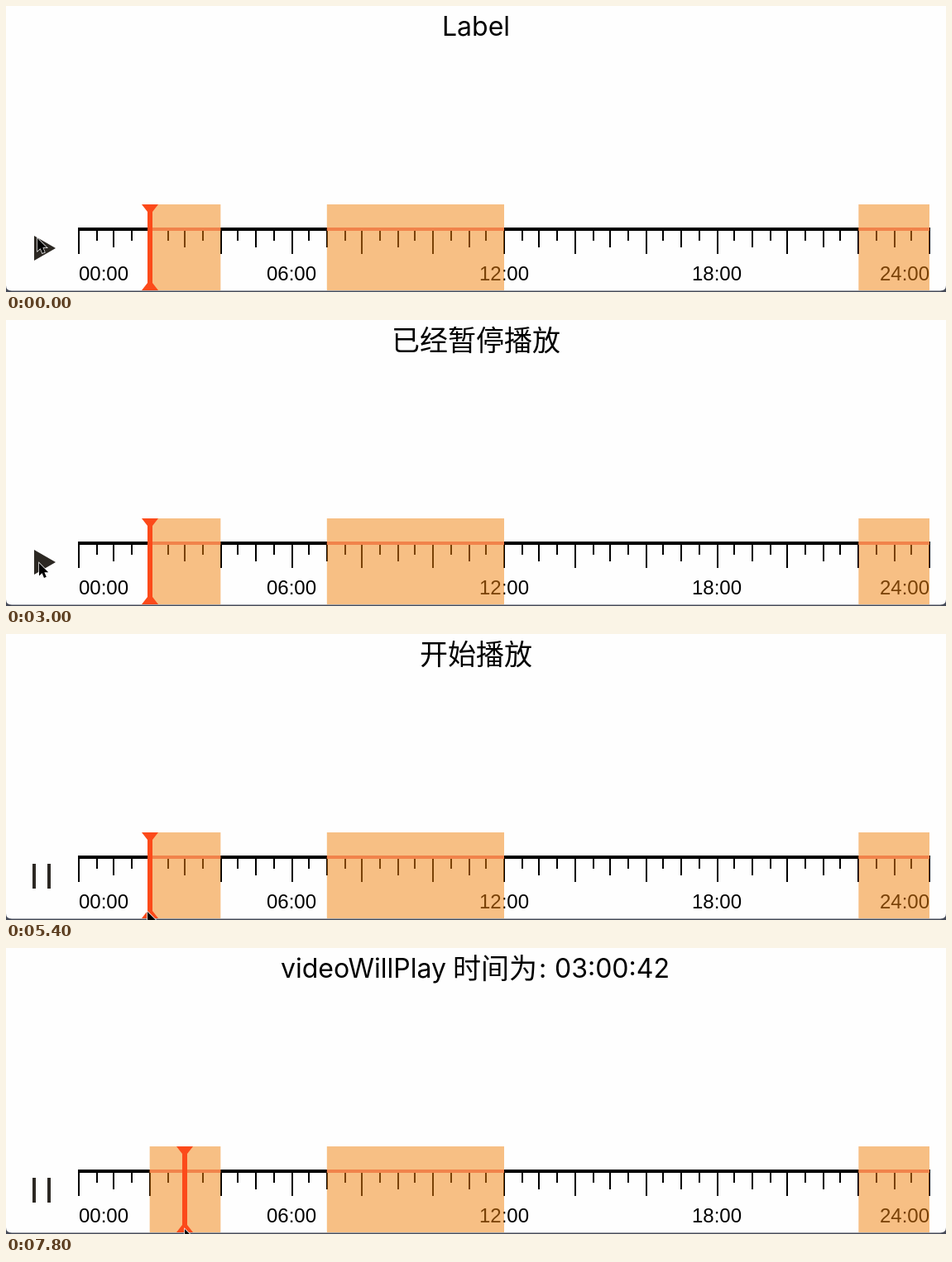
An HTML page that plays this animation: 1136x346 px, repeating every 8 s.

```html
<!DOCTYPE html>
<html lang="zh-CN">
<head>
<meta charset="utf-8">
<title>Timeline</title>
<style>
  html, body { margin: 0; width: 100%; height: 100%; overflow: hidden; background: #fefefe; }
  svg { display: block; width: 100%; height: 100%; }
  .title { font: 32px Inter, sans-serif; }
  .cjk { font: 34px "Noto Sans CJK SC", "Noto Sans CJK", sans-serif; }
  .hour { font: 24px "Liberation Sans", Arial, sans-serif; }
</style>
</head>
<body>
<svg viewBox="0 0 1136 346">
  <rect width="1136" height="346" fill="#454a58"/>
  <path d="M0 0H1136V338Q1136 344.5 1129 344.5H7Q0 344.5 0 338Z" fill="#fefefe"/>

  <text id="label" class="title" x="568" y="36" text-anchor="middle">Label</text>
  <text id="status" class="cjk" x="568" y="37" text-anchor="middle"></text>
  <g id="report">
    <text class="title" x="332" y="36">videoWillPlay</text>
    <text class="cjk" x="540" y="37">时间为</text>
    <text class="title" x="644" y="36">:</text>
    <text class="title" x="663" y="36">03:00:42</text>
  </g>

  <g id="ruler"></g>
  <path id="play" d="M34 278L60 293L34 308Z" fill="#2c2823"/>
  <path id="pause" d="M32 278h4v30h-4ZM50 278h4v30h-4Z" fill="#2c2823"/>
  <path id="handle" d="M-10 240H10L3 249V335L10 344H-10L-3 335V249Z" fill="#fc4a1a"/>
  <circle id="press" r="20" fill="none" stroke="#000" stroke-width="2.6"/>
  <path id="cursor" d="M0 0V15.5L3.6 12.2L6 18L8.8 16.8L6.4 11.2H11.2Z"
        stroke="#fff" stroke-width="1.4" paint-order="stroke"/>
</svg>
<script>
const LOOP = 8000, STEP = 200;
const LEFT = 88, HOUR = 1028 / 24;
const $ = id => document.getElementById(id);

const clips = [[2, 4], [7, 12], [22, 24]];
const cursorKeys = [
  [0, 38, 281], [1000, 39, 277], [1800, 39, 277], [2200, 40, 294], [3000, 40, 294],
  [3600, 40, 291], [4200, 40, 291], [5200, 171, 336], [5800, 171, 336],
  [6600, 210, 338], [7000, 216, 340]
];
const handleKeys = [[5800, 174], [6600, 210], [7000, 216]];
const states = [[0, "label"], [1000, "开始播放"], [2200, "已经暂停播放"], [3600, "开始播放"], [7200, "report"]];

function buildRuler() {
  let out = `<path d="M87 270H1117" stroke="#000" stroke-width="4"/>`;
  for (let i = 0; i <= 48; i++) {
    const x = 2 * Math.round((LEFT + i * HOUR / 2) / 2);
    const end = i % 4 === 0 ? 300 : i % 2 === 0 ? 292 : 284;
    out += `<path d="M${x} 270V${end}" stroke="#000" stroke-width="2"/>`;
  }
  for (let h = 0; h <= 24; h += 6) {
    const anchor = h === 0 ? "start" : h === 24 ? "end" : "middle";
    const text = String(h).padStart(2, "0") + ":00";
    out += `<text class="hour" x="${LEFT + h * HOUR}" y="332" text-anchor="${anchor}">${text}</text>`;
  }
  for (const [from, to] of clips) {
    const x = LEFT + from * HOUR, w = (to - from) * HOUR;
    out += `<rect x="${x}" y="240" width="${w}" height="104" fill="#f1810d" fill-opacity=".5"/>`
         + `<rect x="${x}" y="268" width="${w}" height="4" fill="#f1834b"/>`;
  }
  $("ruler").innerHTML = out;
}

// Eased interpolation between [time, ...values] keys
function sample(keys, t) {
  if (t <= keys[0][0]) return keys[0].slice(1);
  for (let i = 1; i < keys.length; i++) {
    const a = keys[i - 1], b = keys[i];
    if (t <= b[0]) {
      const p = (t - a[0]) / (b[0] - a[0]), e = p * p * (3 - 2 * p);
      return a.slice(1).map((v, k) => v + (b[k + 1] - v) * e);
    }
  }
  return keys[keys.length - 1].slice(1);
}

function show(id, on) {
  $(id).setAttribute("display", on ? "inline" : "none");
}

function render(t) {
  const state = states.filter(s => s[0] <= t).pop()[1];
  const fixed = state === "label" || state === "report";
  show("label", state === "label");
  show("report", state === "report");
  $("status").textContent = fixed ? "" : state;

  const paused = state === "label" || state === "已经暂停播放";
  show("play", paused);
  show("pause", !paused);

  const [x, y] = sample(cursorKeys, t);
  $("cursor").setAttribute("transform", `translate(${x} ${y})`);
  $("handle").setAttribute("transform", `translate(${sample(handleKeys, t)[0]} 0)`);
  show("press", t >= 5800 && t < 7000);
  $("press").setAttribute("cx", x + 1);
  $("press").setAttribute("cy", y + 2);
}

buildRuler();
const start = performance.now();
function tick() {
  const t = (performance.now() - start) % LOOP;
  render(Math.floor(t / STEP) * STEP);
  requestAnimationFrame(tick);
}
tick();
</script>
</body>
</html>
```
